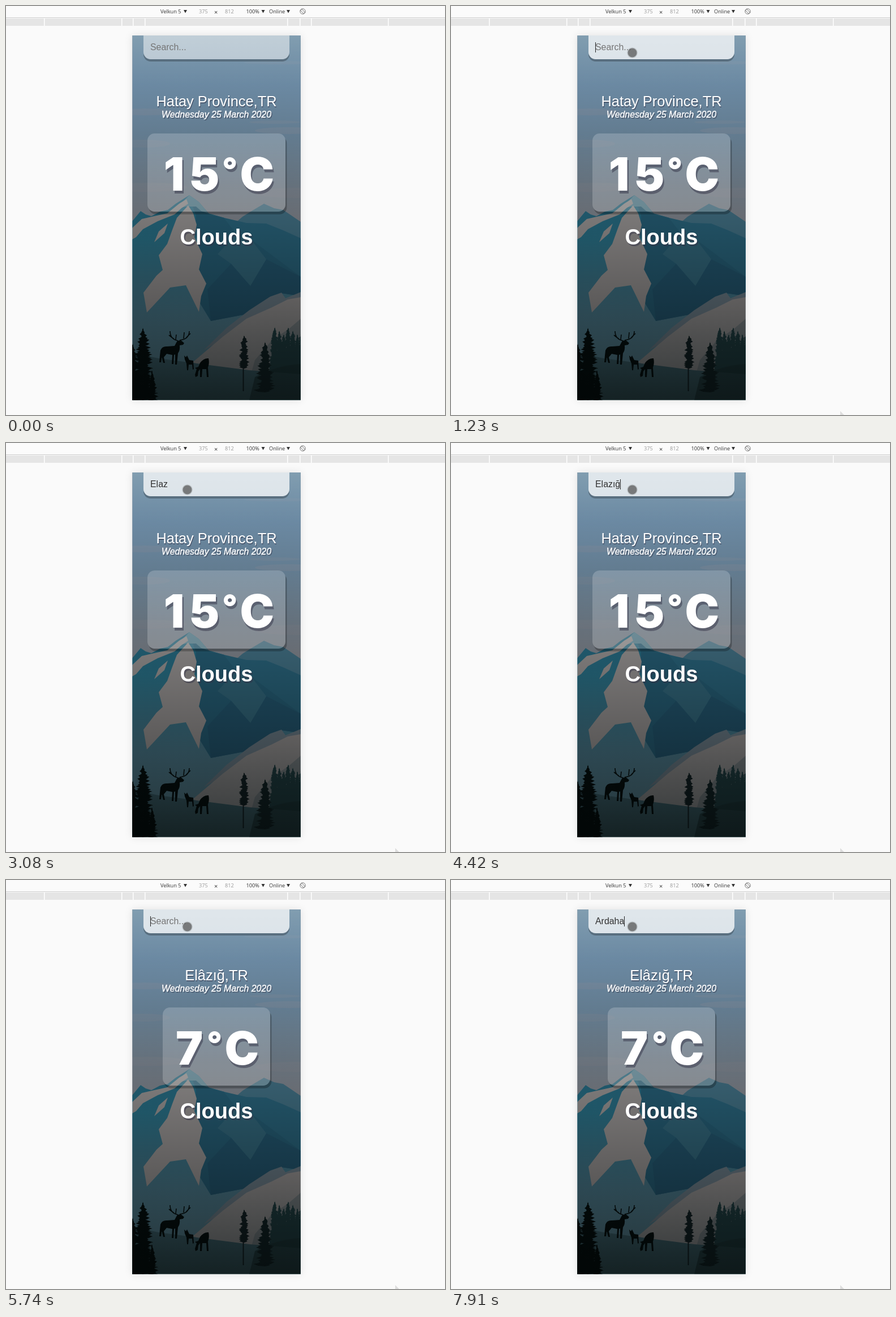
An HTML page with a canvas for the animation above (8000 ms loop, 776 by 722 pixels).

```html
<!DOCTYPE html>
<html lang="en">
<head>
<meta charset="utf-8">
<title>Weather app</title>
<style>
html, body { margin: 0; width: 100%; height: 100%; overflow: hidden; background: #fafafa; }
#stage { position: absolute; left: 0; top: 0; width: 776px; height: 722px; overflow: hidden;
  font-family: Arial, "Liberation Sans", sans-serif; }
#stage > * { position: absolute; }
.bar { font: 9.2px/0 "Open Sans", sans-serif; color: #333; white-space: pre; }
.dim { color: #999; }
.line { left: 223px; width: 298px; text-align: center; line-height: 0; color: #fff; white-space: pre; }
#city { top: 168px; font-size: 25.4px; text-shadow: 1px 2px rgba(50,50,70,.5); }
#date { top: 191.5px; font-size: 15.9px; font-style: italic; -webkit-text-stroke: .35px #fff;
  text-shadow: 1.6px 1.6px rgba(50,50,70,.5); }
#temp { top: 296.5px; font: 900 81px/0 Inter, sans-serif; text-shadow: 2.4px 4.8px rgba(50,50,70,.5); }
.digit { display: inline-block; width: .667em; text-align: center; }
.degree { position: relative; top: -16px; margin: 0 4px; font-size: 59px; }
#sky { top: 407.8px; font-size: 38.1px; font-weight: bold; text-shadow: 2px 3px rgba(50,50,70,.5); }
#card { top: 225px; height: 138px; border-radius: 12.7px; background: rgba(255,255,255,.2);
  box-shadow: 2.4px 4.8px rgba(0,0,0,.25); }
#search { left: 243px; top: 52px; width: 246px; height: 42px; padding-left: 12px; display: flex;
  align-items: center; border-radius: 0 0 12.7px 12.7px; box-shadow: 0 4px rgba(0,0,0,.25);
  font-size: 15.9px; line-height: 42px; color: #313131; }
#hint { position: absolute; left: 12px; color: #757575; }
#caret { width: 1px; height: 18px; background: #222; }
#touch { width: 19px; height: 19px; margin: -9.5px; border-radius: 50%;
  background: radial-gradient(closest-side, rgba(85,85,85,.75) 78%, rgba(150,155,158,.6) 86%, rgba(180,185,188,.4)); }
</style>
</head>
<body>
<div id="stage">
  <canvas id="scene" width="776" height="722" style="left:0;top:0"></canvas>
  <span class="bar" style="left:273px;top:10px">Velkun 5</span>
  <span class="bar dim" style="left:341px;top:10px">375</span>
  <span class="bar" style="left:368px;top:11px;font-size:11px">×</span>
  <span class="bar dim" style="left:387px;top:10px">812</span>
  <span class="bar" style="left:424.5px;top:10px">100%</span>
  <span class="bar" style="left:465px;top:10px">Online</span>
  <div id="card"></div>
  <div id="search"><span id="hint">Search...</span><span id="typed"></span><span id="caret"></span></div>
  <div class="line" id="city"></div>
  <div class="line" id="date">Wednesday 25 March 2020</div>
  <div class="line" id="temp"></div>
  <div class="line" id="sky">Clouds</div>
  <div id="touch"></div>
  <svg id="move" width="15" height="15" viewBox="-7.5 -7.5 15 15" style="left:312.5px;top:75px">
    <path d="M0-6L2.5-3H.8V-.8H3V-2.5L6 0L3 2.5V.8H.8V3H2.5L0 6L-2.5 3H-.8V.8H-3V2.5L-6 0L-3-2.5V-.8H-.8V-3H-2.5Z"
      stroke="#fff" stroke-width="1.6" paint-order="stroke"/>
  </svg>
  <svg id="arrow" width="8" height="7" style="left:688px;top:715px"><path d="M0 0L7 7H0Z" fill="#ddd"/></svg>
</div>
<script>
const $ = id => document.getElementById(id);
const g = $('scene').getContext('2d');
const phone = [223.4, 52, 297.4, 643.6];

function fill(path, color) {
  g.fillStyle = color;
  g.fill(new Path2D(path));
}

function fade(y0, y1, ...stops) {
  const f = g.createLinearGradient(0, y0, 0, y1);
  stops.forEach((c, i) => f.addColorStop(i / (stops.length - 1), c));
  return f;
}

let seed = 7;
function rnd() {
  seed = (seed * 16807) % 2147483647;
  return seed / 2147483647;
}

// Conifer built from ragged tiers; a low bulge gives an even width
function tree(x, top, base, w, color, bulge = .7) {
  g.fillStyle = color;
  g.fillRect(x - 1, top, 2, base - top);
  for (let y = top; y < base - 4; y += 3) {
    const k = w * Math.pow((y - top) / (base - top), bulge) + 1.5;
    const l = k * (.4 + .6 * rnd()), r = k * (.4 + .6 * rnd());
    g.beginPath();
    g.moveTo(x, y - 2);
    g.lineTo(x + r, y + 1 + 3 * rnd());
    g.lineTo(x + r * .6, y + 5);
    g.lineTo(x, y + 6);
    g.lineTo(x - l * .6, y + 5);
    g.lineTo(x - l, y + 1 + 3 * rnd());
    g.fill();
  }
}

function drawChrome() {
  g.fillStyle = '#fafafa';
  g.fillRect(0, 0, 776, 722);
  g.fillStyle = '#fbfbfb';
  g.fillRect(0, 0, 776, 20);
  g.fillStyle = '#ccc';
  g.fillRect(0, 20, 776, 1);
  g.fillStyle = '#e5e5e5';
  g.fillRect(0, 22, 776, 13);
  g.fillStyle = '#fff';
  for (const x of [67, 204, 224, 245, 497, 519, 539, 675]) g.fillRect(x, 22, 1.5, 13);
  for (const x of [314, 451.5, 496]) fill(`M${x} 7h6l-3 5.5Z`, '#333');

  g.save();
  g.translate(524.5, 9.5);
  g.strokeStyle = '#666';
  g.lineWidth = .9;
  g.beginPath();
  g.arc(0, 0, 4.7, 0, 7);
  g.stroke();
  g.rotate(Math.PI / 4);
  g.strokeRect(-4, -1.7, 8, 3.4);
  g.restore();

  g.save();
  g.shadowColor = 'rgba(0,0,0,.1)';
  g.shadowBlur = 14;
  g.fillStyle = '#888';
  g.fillRect(...phone);
  g.restore();
}

function drawSky() {
  g.fillStyle = fade(52, 400, 'rgb(172,210,235)', 'rgb(157,201,238)', 'rgb(160,201,234)',
    'rgb(184,207,228)', 'rgb(218,220,230)');
  g.fillRect(223, 52, 298, 360);
  const cloud = (x, y, w, h, c) => {
    g.fillStyle = c;
    g.beginPath();
    g.ellipse(x, y, w, h, 0, 0, 7);
    g.fill();
  };
  cloud(245, 187, 55, 6, 'rgba(205,205,225,.25)');
  cloud(500, 220, 60, 6, 'rgba(215,215,230,.25)');
  cloud(475, 205, 45, 3, 'rgba(215,215,230,.2)');
  cloud(240, 243, 50, 7, 'rgba(210,210,225,.2)');
  cloud(480, 100, 60, 3, 'rgba(200,215,235,.2)');
  cloud(510, 330, 70, 9, 'rgba(225,220,230,.2)');
  cloud(250, 320, 70, 8, 'rgba(225,220,230,.2)');
}

function drawMountains() {
  fill('M386 400L418 372L434 362L456 349L474 357L490 360L521 381V470H386Z', 'rgb(105,180,212)');
  fill('M223 380L238 362L247 368L257 371L272 363L286 360L300 349L324 334L341 346L358 366L386 374L404 399L433 412L466 440L521 470V660H223Z',
    fade(340, 620, 'rgb(58,165,203)', 'rgb(66,180,216)', 'rgb(92,184,216)', 'rgb(122,196,224)', 'rgb(134,202,226)'));
  fill('M360 367L386 374L425 383L460 384L490 396L521 410V480L433 440Z', 'rgb(66,160,198)');
  fill('M324 336L345 352L360 368L385 374L404 398L433 412L521 478V512L487 507L420 545L362 556L340 520L354 490L341 465L345 440L334 400L336 370Z',
    'rgb(60,150,188)');
  fill('M356 500L398 455L432 494L460 447L521 478V512L487 507L420 545L362 556Z', 'rgb(56,138,178)');
  fill('M404 405L433 412L460 447L432 494L398 455L374 438Z', 'rgb(80,165,198)');
  fill('M324 334L341 346L358 366L345 362L336 354L318 354L300 358Z', 'rgb(135,207,232)');

  const snow = 'rgb(242,237,236)';
  fill('M223 392L240 376L262 371L285 366L306 349L319 341L322 349L310 357L298 368L268 380L242 394L230 408L223 412Z', snow);
  fill('M262 417L270 398L286 384L280 401Z', snow);
  fill('M322 352L331 366L337 386L333 408L347 438L341 465L354 490L345 512L341 540L318 493L290 497L249 541L243 506L266 476L277 466L270 440L285 420L294 395L302 374Z', snow);

  fill('M350 607L390 568L430 537L467 513L487 506L494 516L521 505V560H440Z', 'rgb(172,200,218)');
  fill('M498 518L470 532L425 552L383 584L330 629L360 640L432 655H521V514Z',
    fade(515, 640, 'rgb(245,240,239)', 'rgb(220,226,228)'));
  fill('M440 625L470 590L500 570L521 552V660H430Z', 'rgba(150,175,185,.55)');
}

function drawForeground() {
  const pine = 'rgb(52,102,108)';
  for (let i = 0; i < 7; i++)
    tree(475 + i * 8, 569 + (i % 3) * 6, 665, 13, pine, .5);
  fill('M468 625L485 605L521 600V665H462Z', pine);
  fill('M223 612L270 622L360 634L430 643L521 650V696H223Z', fade(612, 696, 'rgb(100,160,178)', 'rgb(82,134,142)'));
  fill('M440 655Q475 635 521 632V696H430Z', 'rgba(45,85,88,.7)');

  tree(458, 595, 682, 21, 'rgb(28,58,62)', .6);
  tree(421, 583, 640, 10, 'rgb(30,55,60)', .3);
  g.fillRect(418.5, 625, 2, 55);

  const ink = 'rgb(8,26,26)';
  tree(242, 570, 700, 30, ink, .55);
  tree(224, 598, 700, 18, ink, .6);
  tree(258, 645, 700, 14, ink);

  fill('M273 608Q276 600 285 601L298 600Q301 594 303 591L309 590L315 595L313 598L307 599Q308 608 304 613L302 633H299V615L297 616L296 632H293L294 616L284 614L279 620L281 630H278L275 619L276 616L274 629H271L272 617Z', ink);
  fill('M315 617L318 620L320 617L324 625L331 626L332 641L330 642L329 633L323 633L322 643H320L319 631L316 624Z', ink);
  fill('M358 622Q360 630 357 638L358 655H355L354 641L347 641L346 655H343V641L340 645L339 653L335 655L334 651L337 641L334 639L340 637L343 630Q350 621 358 622Z', ink);
  g.strokeStyle = ink;
  g.lineWidth = 1.6;
  g.stroke(new Path2D('M304 591Q290 588 290 574M297 588L288 581M300 589L301 580M307 590Q324 588 324 574M314 587L315 576M319 585L326 578'));
}

function drawScene() {
  drawChrome();
  g.save();
  g.beginPath();
  g.rect(...phone);
  g.clip();
  drawSky();
  drawMountains();
  drawForeground();
  g.fillStyle = fade(52, 696, 'rgba(0,0,0,.25)', 'rgba(0,0,0,.75)');
  g.fillRect(223, 52, 298, 644);
  g.restore();
}

// [time, typed text, caret visible]
const typing = [
  [0, '', 0], [1050, '', 1], [1550, '', 0], [1930, 'E', 1], [2160, 'El', 1], [2240, 'Ela', 1],
  [2620, 'Elaz', 1], [3080, 'Elaz', 0], [3630, 'Elaz', 1], [3950, 'Elazı', 1], [4420, 'Elazığ', 1],
  [4820, '', 1], [5280, '', 0], [5740, '', 1], [6290, '', 0], [6670, 'A', 1], [6900, 'Ar', 1],
  [7050, 'Ard', 1], [7130, 'Arda', 1], [7680, 'Ardah', 1], [7910, 'Ardaha', 1]
];
// [time, x, y]
const path = [[70, 253, 105], [300, 290, 80], [530, 290, 80], [700, 314, 114], [900, 320.5, 82.5]];

const ease = p => p * p * (3 - 2 * p);
const ramp = (t, a, b) => ease(Math.min(1, Math.max(0, (t - a) / (b - a))));
const show = (id, on) => $(id).style.visibility = on ? 'visible' : 'hidden';
const degrees = n => [...String(n)].map(d => `<span class="digit">${d}</span>`).join('') +
  '<span class="degree">°</span>C';

function pointer(t) {
  let [, x, y] = path[0];
  for (let i = 1; i < path.length; i++) {
    const [a, px, py] = path[i - 1], [b, qx, qy] = path[i];
    if (t < a) break;
    const k = ramp(t, a, b);
    x = px + (qx - px) * k;
    y = py + (qy - py) * k;
  }
  return [x, y];
}

function render(t) {
  const [, text, caret] = typing.filter(s => s[0] <= t).pop();
  $('typed').textContent = text;
  show('hint', !text);
  show('caret', caret);
  $('search').style.background = `rgba(255,255,255,${.5 + .25 * ramp(t, 830, 1230)})`;

  const found = t >= 4820;
  $('city').textContent = found ? 'Elâzığ,TR' : 'Hatay Province,TR';
  $('temp').innerHTML = degrees(found ? 7 : 15);
  $('card').style.left = (found ? 277 : 250) + 'px';
  $('card').style.width = (found ? 190 : 244) + 'px';

  const shift = t >= 1780 && t < 2010 || t >= 6290 && t < 6750;
  const [x, y] = pointer(t);
  $('touch').style.left = x + 'px';
  $('touch').style.top = y + 'px';
  show('touch', t >= 70 && !shift);
  show('move', shift);
  show('arrow', t >= 70);
}

drawScene();
const start = performance.now();
function tick() {
  render((performance.now() - start) % 8000);
  requestAnimationFrame(tick);
}
tick();
</script>
</body>
</html>
```
